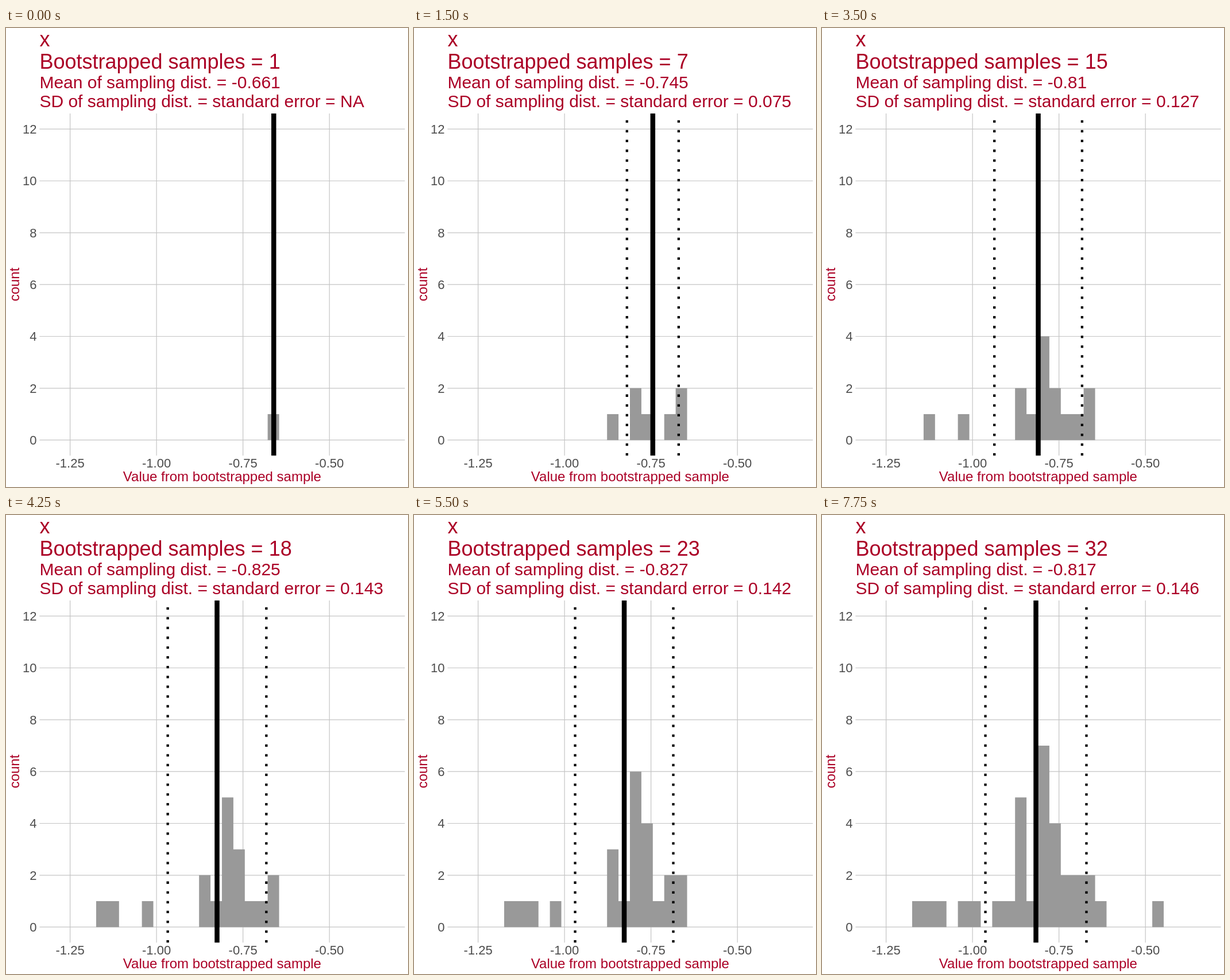
An HTML page that plays this animation: 700x800 px, repeating every 8000 ms.

```html
<!DOCTYPE html>
<html lang="en">
<head>
<meta charset="utf-8">
<title>Bootstrap histogram</title>
<style>
  html, body { margin: 0; width: 100%; height: 100%; overflow: hidden; background: #fff; }
  svg { display: block; }
  text { font-family: "Liberation Sans", Arial, Helvetica, sans-serif; fill: #ab0026; white-space: pre; }
  .title { font-size: 36px; }
  .sub { font-size: 30px; }
  .name { font-size: 24px; text-anchor: middle; }
  .tick { font-size: 22px; fill: #4d4d4d; }
  .grid { stroke: #c4c4c4; stroke-width: 1.2; }
  .bars { fill: #999; }
  .mean { stroke: #000; stroke-width: 8.5; }
  .sd { stroke: #000; stroke-width: 4.27; stroke-dasharray: 4.27 12.8; }
</style>
</head>
<body>
<svg id="plot" width="700" height="800" viewBox="0 0 700 800"></svg>
<script>
const STEP = 250, LOOP = 8000;
const LEFT = 58.4, RIGHT = 694.5, TOP = 149, BOTTOM = 745.3;
const BIN_START = 157, BIN_WIDTH = 19.91;
const samples = [
  .661, .693, .790, .656, .848, .768, .797, .828,
  .768, .733, .796, .861, 1.131, .792, 1.028, .756,
  .786, 1.158, .788, .682, 1.091, .760, .859, .992,
  .728, .794, .893, .912, .848, .618, .848, .470
].map(v => -v);

const svg = document.getElementById('plot');
const px = v => 111.6 + (v + 1.25) * 602.1;
const py = c => 718.2 - c * 45.17;

function add(tag, attrs, text = '') {
  const el = document.createElementNS('http://www.w3.org/2000/svg', tag);
  for (const key in attrs) el.setAttribute(key, attrs[key]);
  el.textContent = text;
  return svg.appendChild(el);
}
const line = (cls, x1, y1, x2, y2) => add('line', { class: cls, x1, y1, x2, y2 });
const label = (cls, x, y, text, more) => add('text', { class: cls, x, y, ...more }, text);

for (let c = 0; c <= 12; c += 2) {
  line('grid', LEFT, py(c), RIGHT, py(c));
  label('tick', 53.6, py(c) + 7.8, c, { 'text-anchor': 'end' });
}
for (let v = -1.25; v <= -.5; v += .25) {
  line('grid', px(v), TOP, px(v), BOTTOM);
  label('tick', px(v), 766, v.toFixed(2), { 'text-anchor': 'middle' });
}
label('name', 376.4, 790, 'Value from bootstrapped sample');
label('name', 0, 0, 'count', { transform: 'translate(22.5 447) rotate(-90)' });
label('title', LEFT, 31.8, 'x');
const countText = label('title', LEFT, 70.6);
const meanText = label('sub', LEFT, 105.2);
const sdText = label('sub', LEFT, 137.6);

const bars = add('path', { class: 'bars' });
const vertical = cls => line(cls, 0, BOTTOM, 0, TOP);
const meanLine = vertical('mean');
const sdLines = [vertical('sd'), vertical('sd')];

function moveTo(el, x) {
  el.setAttribute('x1', x);
  el.setAttribute('x2', x);
}

function barPath(values) {
  const counts = {};
  for (const v of values) {
    const bin = Math.floor((px(v) - BIN_START) / BIN_WIDTH);
    counts[bin] = (counts[bin] || 0) + 1;
  }
  return Object.entries(counts).map(([bin, c]) =>
    `M${BIN_START + bin * BIN_WIDTH} ${py(0)}V${py(c)}h${BIN_WIDTH}V${py(0)}z`).join('');
}

function draw(n) {
  const values = samples.slice(0, n);
  const mean = values.reduce((a, v) => a + v, 0) / n;
  const sd = Math.sqrt(values.reduce((a, v) => a + (v - mean) ** 2, 0) / (n - 1));
  const round = v => String(+v.toFixed(3));

  countText.textContent = `Bootstrapped samples = ${n}`;
  meanText.textContent = `Mean of sampling dist. = ${round(mean)}`;
  sdText.textContent = `SD of sampling dist. = standard error = ${n > 1 ? round(sd) : 'NA'}`;
  bars.setAttribute('d', barPath(values));
  moveTo(meanLine, px(mean));
  sdLines.forEach((el, i) => {
    el.style.display = n > 1 ? '' : 'none';
    if (n > 1) moveTo(el, px(mean + (i ? sd : -sd)));
  });
}

const start = performance.now();
let shown = 0;
function tick() {
  const n = 1 + Math.floor((performance.now() - start) % LOOP / STEP);
  if (n !== shown) draw(shown = n);
  requestAnimationFrame(tick);
}
tick();
</script>
</body>
</html>
```
